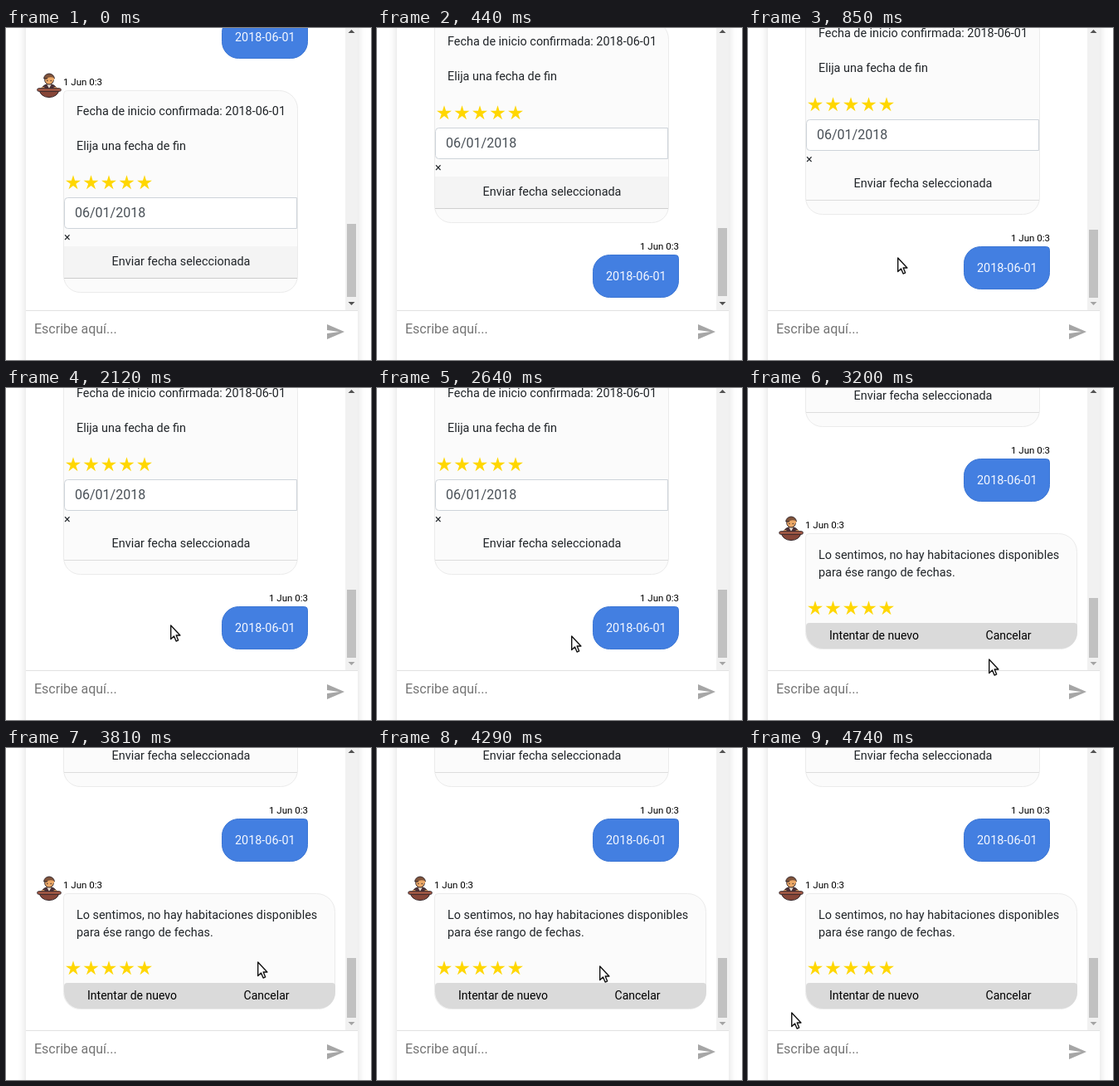
Write an HTML page with a canvas that moves like this. It is 440 px wide and 400 px high and loops after 4.78 s.

```html
<!DOCTYPE html>
<html lang="es">
<head>
<meta charset="utf-8">
<title>Chat de reservas</title>
<style>
html, body { margin: 0; width: 100%; height: 100%; overflow: hidden; background: #fff; }
canvas { display: block; }
</style>
</head>
<body>
<canvas id="stage" width="440" height="400"></canvas>
<script>
const ctx = document.getElementById('stage').getContext('2d');
const LOOP = 4780, VIEW = 340;
const SENT = 350, ANSWERED = 2680;
const INK = '#212529';

// Turning points of the pointer: time, x, y
const turns = [
  [850, 180, 276], [1060, 191, 282], [1230, 192, 282], [1390, 196, 283], [2080, 196, 283],
  [2120, 198, 285], [2500, 249, 305], [2800, 218, 291], [3200, 290, 326],
  [3430, 152, 285], [3560, 200, 211], [3700, 312, 226], [3810, 303, 257],
  [4050, 88, 295], [4370, 298, 258], [4730, 52, 318]
];

function spline(a, b, c, d, u) {
  return b + u * ((c - a) / 2 + u * (a - 2.5 * b + 2 * c - d / 2 + u * (1.5 * (b - c) + (d - a) / 2)));
}

function pointerAt(t) {
  const i = turns.filter(p => p[0] <= t).length - 1;
  if (i < 0) return null;
  const at = k => turns[Math.max(0, Math.min(turns.length - 1, k))];
  const span = at(i + 1)[0] - at(i)[0];
  const u = span ? (t - at(i)[0]) / span : 0;
  return [1, 2].map(k => Math.round(spline(at(i - 1)[k], at(i)[k], at(i + 1)[k], at(i + 2)[k], u)));
}

// The picture advances once every 40 ms
function hold(t) {
  const base = [0, SENT, 850, 2120, 3730].filter(b => b <= t).pop();
  return base + Math.floor((t - base) / 40) * 40;
}

function glide(t, start, length) {
  const u = Math.max(0, Math.min(1, (t - start) / length));
  return 0.5 - 0.5 * Math.cos(Math.PI * u);
}

function scrollAt(t) {
  return Math.ceil(94 * (t < SENT ? 0 : glide(t, 290, 180)) + 178 * glide(t, 2640, 220));
}

function paint(fill, line, width = 1) {
  ctx.fillStyle = fill;
  ctx.fill();
  if (!line) return;
  ctx.strokeStyle = line;
  ctx.lineWidth = width;
  ctx.stroke();
}

function box(x, y, w, h, radii, fill, line) {
  ctx.beginPath();
  ctx.roundRect(x, y, w, h, radii);
  paint(fill, line);
}

function rect(x, y, w, h, fill) {
  ctx.fillStyle = fill;
  ctx.fillRect(x, y, w, h);
}

function poly(points, fill, line, width) {
  ctx.beginPath();
  points.forEach(([x, y]) => ctx.lineTo(x, y));
  ctx.closePath();
  paint(fill, line, width);
}

function oval(x, y, rx, ry, fill, line, from = 0, to = 2 * Math.PI) {
  ctx.beginPath();
  ctx.ellipse(x, y, rx, ry, 0, from, to);
  ctx.closePath();
  paint(fill, line);
}

function text(str, x, y, size = 14.4, color = INK, align = 'left') {
  ctx.font = size + 'px Roboto, Arial, sans-serif';
  ctx.textAlign = align;
  ctx.fillStyle = color;
  ctx.fillText(str, x, y);
}

function stars(y) {
  for (let n = 0; n < 5; n++) {
    const pts = Array.from({ length: 10 }, (_, k) => {
      const r = k % 2 ? 3.5 : 9.4, a = k * Math.PI / 5;
      return [81 + n * 21.5 + r * Math.sin(a), y - r * Math.cos(a)];
    });
    poly(pts, '#ffd700');
  }
}

function avatar(y) {
  const dark = '#33262a', skin = '#eca968', hair = '#80533a';
  ctx.save();
  ctx.translate(37, y);
  oval(15, 20, 9, 6.5, '#4a3037', dark, Math.PI, 0);
  poly([[12.5, 14], [17.5, 14], [15, 19]], '#e9dfd6');
  oval(15, 8.5, 5.3, 5.5, skin, dark);
  oval(15, 7, 6.3, 6, hair, dark, Math.PI, 0);
  oval(17, 7.5, 4.2, 2.2, skin);
  for (const side of [-1, 1]) {
    oval(15 + side * 2.2, 9.5, 0.7, 0.8, dark);
    oval(15 + side * 7.5, 18.5, 2.4, 1.6, skin);
  }
  oval(15, 21, 11.5, 8.5, '#874638', dark, 0, Math.PI);
  box(0.7, 18.7, 28.6, 3.6, 2, '#a65a45', dark);
  ctx.restore();
}

function botHead(y) {
  avatar(y);
  text('1 Jun 0:3', 69, y + 15, 11.52, '#000');
}

function card(y, w, h) {
  box(69.5, y + 0.5, w, h, [4, 22, 20, 20], '#fbfbfb', '#ebebeb');
}

function userBubble(y) {
  text('1 Jun 0:3', 364, y - 6, 11.52, '#000', 'right');
  box(260.5, y + 0.5, 103, 51, [20, 4, 20, 20], '#437fe1', '#3c76d4');
  text('2018-06-01', 276, y + 31, 14.4, '#f4f7ff');
}

function dateCard(hover) {
  botHead(54);
  card(75, 282, 243);
  text('Fecha de inicio confirmada: 2018-06-01', 85, 105);
  text('Elija una fecha de fin', 85, 147);
  stars(186.6);
  box(70.5, 204.5, 280, 37, [4, 0, 0, 4], '#fff', '#ced4da');
  text('06/01/2018', 83, 228, 16, '#495057');
  text('×', 70, 257);
  rect(70, 263, 281, 38, `rgba(244,244,244,${hover})`);
  const g = 221 - 17 * hover;
  rect(70, 301, 281, 1, `rgb(${g},${g},${g})`);
  text('Enviar fecha seleccionada', 211, 286, 14.4, INK, 'center');
}

function retryCard() {
  botHead(426);
  card(447, 327, 139);
  text('Lo sentimos, no hay habitaciones disponibles', 85, 478);
  text('para ése rango de fechas.', 85, 499);
  stars(537.6);
  box(70, 555, 327, 31, [4, 4, 20, 20], '#dadada');
  text('Intentar de nuevo', 152, 575, 14, '#000', 'center');
  text('Cancelar', 314, 575, 14, '#000', 'center');
}

function scrollbar(t, s) {
  const end = t >= ANSWERED ? 272 : t >= SENT ? 94 : 0;
  const h = end === 272 ? 72 : end ? 82 : 88;
  const bottom = end ? 325 : 324;
  rect(409, 0, 15, VIEW, '#f1f1f1');
  rect(411, Math.round(bottom - h - (end - s) * 0.235), 11, h, '#c1c1c1');
  poly([[412.5, 6], [416.5, 2], [420.5, 6]], '#505050');
  poly([[412.5, 330], [416.5, 334], [420.5, 330]], end && s >= end ? '#a3a3a3' : '#505050');
}

function panel() {
  ctx.save();
  ctx.shadowColor = 'rgba(0,0,0,0.14)';
  ctx.shadowBlur = 10;
  rect(24, -30, 400, 460, '#fff');
  ctx.restore();
}

function footer() {
  rect(24, VIEW, 400, 60, '#fff');
  rect(24, VIEW, 400, 1, '#e2e2e2');
  text('Escribe aquí...', 34, 368, 16, '#757575');
  poly([[387, 375], [408, 366], [387, 357], [387, 364], [402, 366], [387, 368]], '#a6a6a6');
}

function pointer(x, y) {
  const arrow = [[0, 0], [0, 16.5], [3.8, 13], [6.4, 19], [9, 17.9], [6.5, 12], [11.2, 12]];
  ctx.save();
  ctx.translate(x + 0.7, y + 1);
  ctx.lineJoin = 'round';
  poly(arrow, '#fff', '#111', 1.4);
  ctx.restore();
}

function draw(t) {
  const s = scrollAt(t);
  rect(0, 0, 440, 400, '#fff');
  panel();
  ctx.save();
  ctx.beginPath();
  ctx.rect(24, 0, 385, VIEW);
  ctx.clip();
  ctx.translate(0, -s);
  userBubble(-15);
  dateCard(1 - glide(t, SENT, 300));
  if (t >= SENT) userBubble(357);
  if (t >= ANSWERED) retryCard();
  ctx.restore();
  scrollbar(t, s);
  footer();
  const p = pointerAt(t);
  if (p) pointer(...p);
}

const start = performance.now();
function tick() {
  draw(hold((performance.now() - start) % LOOP));
  requestAnimationFrame(tick);
}
tick();
</script>
</body>
</html>
```
